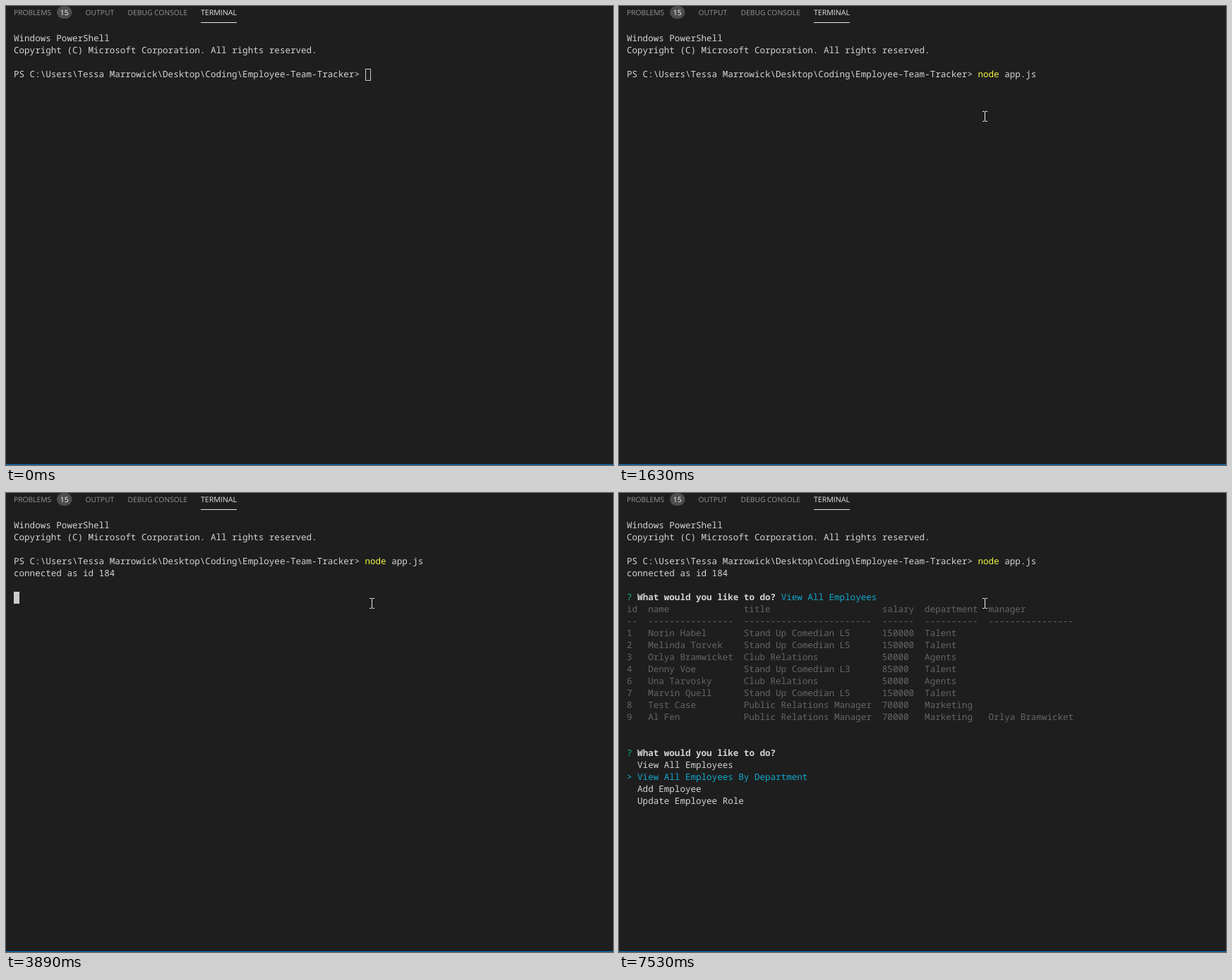
An HTML page that plays this animation: 860x651 px, repeating every 8000 ms.

```html
<!DOCTYPE html>
<html lang="en">
<head>
<meta charset="utf-8">
<title>Terminal session</title>
<style>
html, body { margin: 0; width: 100%; height: 100%; overflow: hidden; background: #1e1e1e; }
svg { display: block; }
text { white-space: pre; text-rendering: geometricPrecision; }
.tabs { font: 10.3px "Open Sans", "Noto Sans", sans-serif; fill: #979797; }
.tabs .on { fill: #e7e7e7; }
.tabs .count { fill: #fff; }
#term { font: 500 12.575px "Noto Sans Mono", "DejaVu Sans Mono", monospace; fill: #d4d4d4; }
.b { font-weight: 700; }
.y { fill: #f5f543; }
.c { fill: #11a8cd; }
.g { fill: #0dbc79; }
.d { fill: #666; font-weight: 400; }
</style>
</head>
<body>
<svg width="860" height="651" viewBox="0 0 860 651">
  <rect width="860" height="651" fill="#1e1e1e"/>
  <g class="tabs">
    <rect x="72" y="0" width="21.5" height="18" rx="9" fill="#4d4d4d"/>
    <text x="11" y="13">PROBLEMS</text>
    <text class="count" x="82.7" y="13" text-anchor="middle">15</text>
    <text x="112.5" y="13">OUTPUT</text>
    <text x="172.5" y="13">DEBUG CONSOLE</text>
    <text class="on" x="276" y="13" font-size="10.6">TERMINAL</text>
    <rect class="on" x="276" y="23" width="51" height="1"/>
  </g>
  <rect y="650" width="860" height="1" fill="#007acc"/>
  <g id="term"></g>
  <circle id="click" cx="517" cy="155.5" r="14" fill="#8a8710"/>
  <path id="mouse" d="M-3.5 -7h3m1 0h3M-3.5 7h3m1 0h3M0 -6.5v13" fill="none" stroke="#f0f0f0"/>
</svg>
<script>
const LOOP = 8000, LEFT = 11, CELL = 7.545, ROW = 17;
const $ = id => document.getElementById(id);
const span = (cls, s) => `<tspan class="${cls}">${s}</tspan>`;
const line = (row, s) => `<text x="${LEFT}" y="${50 + row * ROW}">${s}</text>`;

const PROMPT = "PS C:\\Users\\Tessa Marrowick\\Desktop\\Coding\\Employee-Team-Tracker&gt; ";
const PROMPT_COLS = 66;
const COMMAND = span("y", "node") + " app.js";
const QUESTION = span("g", "?") + " " + span("b", "What would you like to do?");
const CHOICES = ["View All Employees", "View All Employees By Department", "Add Employee", "Update Employee Role"];

const WIDTHS = [2, 16, 24, 6, 10, 16];
const comic = "Stand Up Comedian L", club = "Club Relations", pr = "Public Relations Manager";
const TABLE = [
  ["id", "name", "title", "salary", "department", "manager"],
  WIDTHS.map(n => "-".repeat(n)),
  [1, "Norin Habel", comic + 5, 150000, "Talent"],
  [2, "Melinda Torvek", comic + 5, 150000, "Talent"],
  [3, "Orlya Bramwicket", club, 50000, "Agents"],
  [4, "Denny Voe", comic + 3, 85000, "Talent"],
  [6, "Una Tarvosky", club, 50000, "Agents"],
  [7, "Marvin Quell", comic + 5, 150000, "Talent"],
  [8, "Test Case", pr, 70000, "Marketing"],
  [9, "Al Fen", pr, 70000, "Marketing", "Orlya Bramwicket"]
];

function table(row) {
  return TABLE.map((cells, i) => {
    const s = cells.map((v, k) => String(v).padEnd(WIDTHS[k])).join("  ");
    return line(row + i, span("d", s));
  }).join("");
}

function menu(row, picked, hint) {
  return line(row, QUESTION + hint) + CHOICES.map((s, i) =>
    line(row + 1 + i, i === picked ? span("c", "&gt; " + s) : "  " + s)).join("");
}

function caret(col, row, solid) {
  const x = Math.round(LEFT + col * CELL), y = 38 + row * ROW;
  return solid
    ? `<rect x="${x}" y="${y}" width="8" height="17" fill="#ccc"/>`
    : `<rect x="${x + .5}" y="${y + .5}" width="7" height="16" fill="none" stroke="#ccc"/>`;
}

function terminal(t) {
  let out = line(0, "Windows PowerShell")
    + line(1, "Copyright (C) Microsoft Corporation. All rights reserved.")
    + line(3, PROMPT + (t >= 1630 ? COMMAND : ""));
  if (t < 1630) return out + caret(PROMPT_COLS, 3, t >= 1170);
  if (t < 1720) return out;
  if (t < 1870) return out + caret(PROMPT_COLS + 11, 3, true);
  if (t < 3890) return out + caret(0, 4, true);
  out += line(4, "connected as id 184");
  if (t < 3970) return out + caret(0, 6, true);
  const hint = " (Use arrow keys)";
  if (t < 5120) return out + menu(6, 0, hint);
  out += line(6, QUESTION + " " + span("c", CHOICES[0])) + table(7);
  return out + (t < 7530 ? menu(19, 0, hint) : menu(19, 1, ""));
}

// Pointer stops: time, x, y
const STOPS = [
  [70, 603.5, 515.5], [150, 519.5, 320.5], [230, 468.5, 226.5],
  [460, 479.5, 209.5], [540, 505.5, 174.5], [610, 518.5, 156.5]
];

let shown = "";
function draw() {
  const t = performance.now() % LOOP;
  const html = terminal(t);
  if (html !== shown) $("term").innerHTML = shown = html;
  const stop = STOPS.filter(s => s[0] <= t).pop();
  $("mouse").style.display = stop ? "" : "none";
  if (stop) $("mouse").setAttribute("transform", `translate(${stop[1]} ${stop[2]})`);
  $("click").style.display = t >= 940 && t < 1090 ? "" : "none";
  requestAnimationFrame(draw);
}
draw();
</script>
</body>
</html>
```
